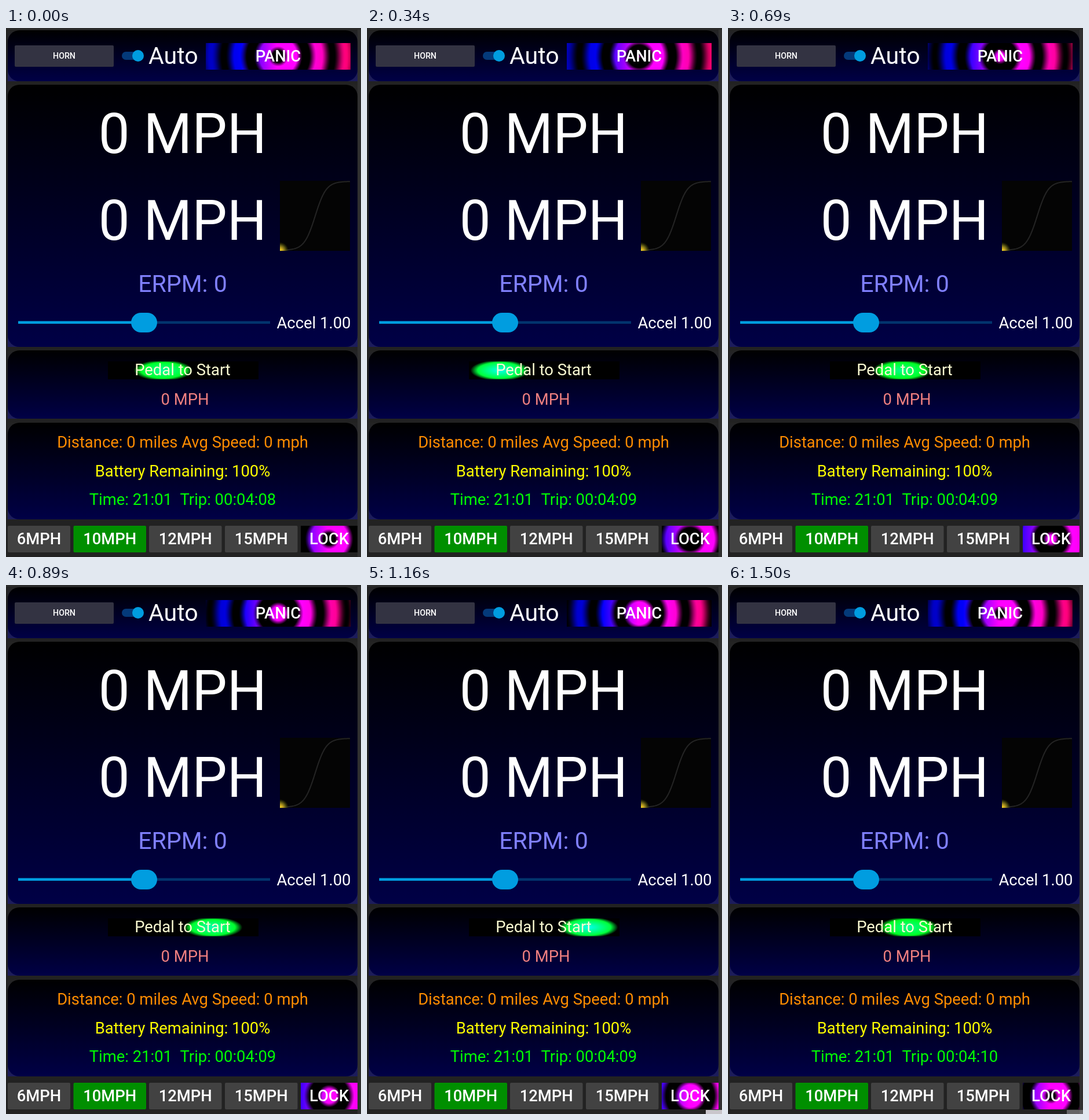
Animation, 613 px wide and 914 px high, one loop 1570 ms. Source, as an HTML page with a canvas:

```html
<!DOCTYPE html>
<html lang="en">
<head>
<meta charset="utf-8">
<title>Ride dashboard</title>
<style>
  html, body { margin: 0; width: 613px; height: 914px; overflow: hidden; background: #222; }
  canvas { display: block; }
</style>
</head>
<body>
<canvas id="stage" width="613" height="914"></canvas>
<script>
const ctx = document.getElementById('stage').getContext('2d');
const LOOP = 1570, STEPS = 23, STEP = LOOP / STEPS;
const OMEGA = 2 * Math.PI / 1.64;
const EM = 13.7, MID = 305;
const BLUE = '#009de0', TRACK = '#02346e';
const clamp = v => Math.max(0, Math.min(1, v));

function box(x, y, w, h, fill, radius = 0) {
  ctx.fillStyle = fill;
  ctx.beginPath();
  ctx.roundRect(x, y, w, h, radius);
  ctx.fill();
}

function text(str, x, y, ems, color = '#fff', weight = 400, align = 'center') {
  ctx.font = `${weight} ${ems * EM}px Roboto, sans-serif`;
  ctx.textAlign = align;
  ctx.fillStyle = color;
  ctx.fillText(str, x, y);
}

function vertical(y, h, top, bottom) {
  const g = ctx.createLinearGradient(0, y, 0, y + h);
  g.addColorStop(0, top);
  g.addColorStop(1, bottom);
  return g;
}

function card(y, h) {
  box(3, y, 604, h, vertical(y, h, '#242424', '#1c1c5c'));
  box(3, y, 604, h, vertical(y, h, '#000', '#000046'), 20);
}

// Fill a rectangle per pixel; colorAt gets offsets from the centre, returns rgb in 0..1
function shade(x, y, w, h, colorAt) {
  const img = ctx.createImageData(w, h);
  for (let j = 0, p = 0; j < h; j++) {
    for (let i = 0; i < w; i++, p += 4) {
      const rgb = colorAt(i + 0.5 - w / 2, j + 0.5 - h / 2);
      for (let c = 0; c < 3; c++) img.data[p + c] = 255 * clamp(rgb[c]);
      img.data[p + 3] = 255;
    }
  }
  ctx.putImageData(img, x, y);
}

// Rings run outwards and lose contrast with distance
function rings(x, y, w, h, t) {
  shade(x, y, w, h, (dx, dy) => {
    const r = Math.hypot(dx, dy);
    const wave = Math.cos(r * 2 * Math.PI / 46 - OMEGA * (t + 0.08));
    const light = clamp(0.5 - (0.35 + 0.85 * Math.exp(-r / 70)) * wave);
    const red = clamp((dx + 64) / 62);
    const blue = dx > 0 ? 1 - Math.max(0, dx - 40) * 0.0068 : 1 - Math.max(0, -dx - 60) * 0.004;
    return [red * light, 0, blue * light];
  });
}

function pedalGlow(t) {
  const swing = Math.sin(OMEGA * (t - 0.7));
  shade(176, 576, 260, 31, (dx, dy) => {
    const glow = Math.max(0, 1 - Math.hypot((dx - 78 * swing) / 51, dy / 18));
    return [0, 4 * glow, glow * (0.55 + 0.4 * swing * swing)];
  });
}

function curve() {
  const x = 473, y = 264, size = 121;
  box(x, y, size, size, '#040404');
  ctx.save();
  ctx.beginPath();
  ctx.rect(x, y, size, size);
  ctx.clip();
  ctx.beginPath();
  for (let i = 0; i <= size; i++) {
    ctx.lineTo(x + i, y + 1 + (size - 2) / (1 + Math.exp((i - 61) / 9.5)));
  }
  ctx.strokeStyle = '#242424';
  ctx.lineWidth = 2;
  ctx.stroke();
  const g = ctx.createRadialGradient(x, y + size, 0, x, y + size, 15);
  g.addColorStop(0, '#ffe020');
  g.addColorStop(0.35, '#c0a020');
  g.addColorStop(0.65, '#5c5814');
  g.addColorStop(1, '#40400000');
  box(x, y + size - 15, 15, 15, g);
  ctx.restore();
}

function speedButton(label, x, w, fill = '#424242') {
  box(x, 860, w, 46, fill, 2);
  text(label, x + w / 2, 892, 2, '#fff', 500);
}

function draw(frame) {
  const t = frame * STEP / 1000;
  box(0, 0, 613, 914, '#222');
  box(607, 0, 6, 914, '#303030');
  box(0, 0, 613, 3, '#2b2b2b');

  card(4, 88);
  box(15, 30, 171, 37, '#333342', 2);
  text('HORN', 100.5, 53, 1.04, '#fff', 500);
  box(200, 41, 34, 14, '#043a7a', 7);
  box(218, 38, 20, 20, BLUE, 10);
  text('Auto', 246, 62, 3, '#fff', 400, 'left');
  rings(345, 26, 250, 46, t);
  text('PANIC', 470, 58, 2, '#fff', 500);

  card(98, 453);
  text('0 MPH', MID, 216, 7);
  text('0 MPH', MID, 366, 7);
  curve();
  text('ERPM: 0', MID, 456, 3, '#8080ff');
  box(21, 506.5, 435, 4.5, TRACK);
  box(21, 506.5, 217, 4.5, BLUE);
  box(216, 492, 45, 34, BLUE, 17);
  text('Accel 1.00', 467.5, 518.5, 2, '#fff', 400, 'left');

  card(557, 118);
  pedalGlow(t);
  text('Pedal to Start', MID, 600, 2, '#fafad2');
  text('0 MPH', 309, 651, 2, '#f08080');

  card(682, 167);
  text('Distance: 0 miles Avg Speed: 0 mph', MID, 725, 2, '#ff8c00');
  text('Battery Remaining: 100%', MID, 775, 2, '#ff0');
  const seconds = 8 + (frame >= 5) + (frame >= 20);
  text(`Time: 21:01\u00a0 Trip: 00:04:${String(seconds).padStart(2, '0')}`, MID, 824, 2, '#0f0');

  speedButton('6MPH', 3, 108);
  speedButton('10MPH', 116.5, 125.5, '#008f00');
  speedButton('12MPH', 247, 125.5);
  speedButton('15MPH', 378, 125.5);
  rings(509, 860, 98, 46, t);
  text('LOCK', 558, 892, 2, '#fff', 500);

  // Grey tab that shows briefly in the bottom corner
  ctx.globalAlpha = frame < 18 ? clamp((frame - 13) / 3) : 1 - (frame - 17) * 0.12;
  box(585, 907, 28, 7, '#c8c5cb');
  ctx.globalAlpha = 1;
}

let shown = -1;
function tick() {
  const frame = Math.min(STEPS - 1, Math.floor((performance.now() % LOOP + 6) / STEP));
  if (frame !== shown) draw(shown = frame);
  requestAnimationFrame(tick);
}
tick();
</script>
</body>
</html>
```
